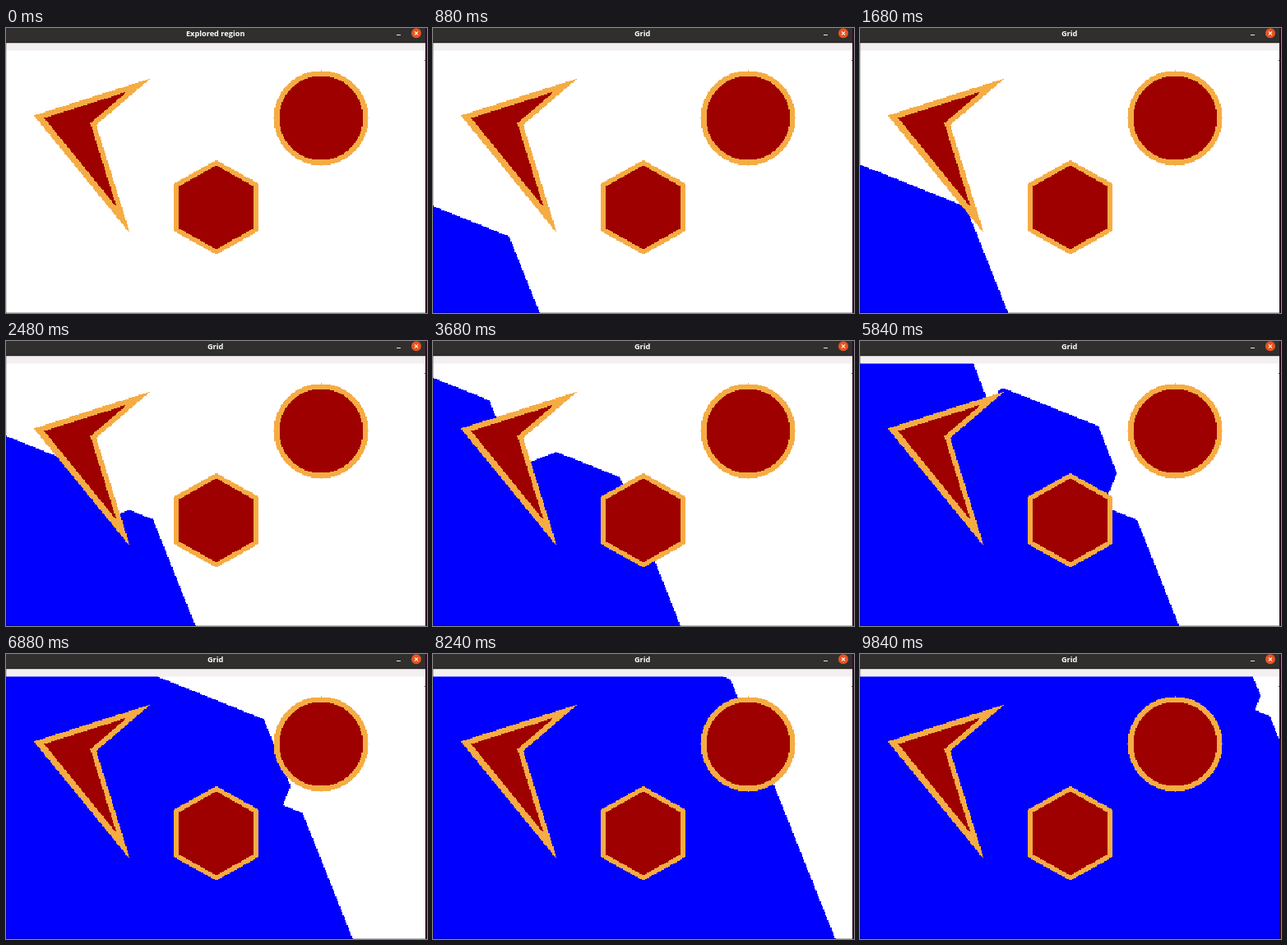
Recreate the animation shown at these times as an HTML page with a canvas. Size 512 by 347 pixels, loop 9.92 s.

```html
<!DOCTYPE html>
<html lang="en">
<head>
<meta charset="utf-8">
<title>Explored region</title>
<style>
  html, body { margin: 0; width: 100%; height: 100%; overflow: hidden; background: #fff; }
  canvas { position: absolute; left: 0; top: 27px; width: 510px; height: 320px; image-rendering: pixelated; }
  svg { position: absolute; left: 0; top: 0; display: block; }
</style>
</head>
<body>
<canvas id="map" width="400" height="250"></canvas>
<svg width="512" height="347" viewBox="0 0 512 347">
  <rect width="512" height="18" fill="#302f2e"/>
  <rect y="17" width="512" height="1.5" fill="#1f1e1d"/>
  <rect y="18.5" width="511" height="9" fill="#f4eff1"/>
  <text id="title" x="254.7" y="10" text-anchor="middle" fill="#fff" font-family="'Open Sans', 'Noto Sans', sans-serif" font-weight="700" font-size="9.2"></text>
  <rect x="475" y="8" width="5" height="1" fill="#e8e8e8"/>
  <circle cx="499" cy="6.3" r="6" fill="#e95420"/>
  <path d="M497 4.3l4 4m0-4l-4 4" stroke="#fff" stroke-width="1.1"/>
  <rect y="18" width="1" height="329" fill="#000" opacity=".2"/>
  <rect y="346" width="511" height="1" fill="#000" opacity=".25"/>
  <rect x="510" width="2" height="347" fill="#2d0a20"/>
  <rect x="509" y="39" width="2" height="1" fill="#333"/>
</svg>
<script>
const W = 400, H = 250, STEP = 80, FRAMES = 124;
const FREE = 0, MARGIN = 1, SOLID = 2;

const hexagon = (w, h) => [[0, h], [w, h / 2], [w, -h / 2], [0, -h], [-w, -h / 2], [-w, h / 2]]
  .map(([x, y]) => [200 + x, 100 + y]);
const solidShapes = [
  [[36, 185], [115, 210], [80, 180], [105, 100]],
  hexagon(35.4, 40)
];
const marginShapes = [
  [[26, 187.4], [137.3, 222.6], [85.6, 178.4], [117.6, 75.6]],
  hexagon(40.4, 44.9)
];

function inside(poly, x, y) {
  let hit = false;
  poly.forEach(([ax, ay], i) => {
    const [bx, by] = poly[(i + 1) % poly.length];
    if ((ay > y) !== (by > y) && x < ax + (y - ay) * (bx - ax) / (by - ay)) hit = !hit;
  });
  return hit;
}

function kindAt(x, y) {
  const r = Math.hypot(x - 300, y - 185);
  if (r < 40 || solidShapes.some(p => inside(p, x, y))) return SOLID;
  if (r <= 45 || marginShapes.some(p => inside(p, x, y))) return MARGIN;
  return FREE;
}

const kind = new Uint8Array(W * H);
for (let y = 0; y < H; y++)
  for (let x = 0; x < W; x++) kind[y * W + x] = kindAt(x, y);

// Dijkstra with bucketed costs: 5 per straight step, 7 per diagonal
const cost = new Int32Array(W * H).fill(1e9);
const order = [];
const buckets = [[0]];
cost[0] = 0;
for (let c = 0; c < buckets.length; c++) {
  for (const cell of buckets[c] || []) {
    if (cost[cell] !== c) continue;
    order.push(cell);
    const x = cell % W, y = (cell - x) / W;
    for (let dy = -1; dy <= 1; dy++) {
      for (let dx = -1; dx <= 1; dx++) {
        const nx = x + dx, ny = y + dy, next = ny * W + nx;
        if (nx < 0 || ny < 0 || nx >= W || ny >= H || kind[next] !== FREE) continue;
        const total = c + (dx && dy ? 7 : 5);
        if (total >= cost[next]) continue;
        cost[next] = total;
        (buckets[total] = buckets[total] || []).push(next);
      }
    }
  }
}

// step, x, y: cell the front has just reached
const reached = (x, y) => order.filter(cell => cost[cell] <= cost[y * W + x]).length;
const knots = [[0, 0], ...[
  [11, 101, 0], [31, 180, 0], [60, 272, 0], [86, 330, 0], [103, 383, 0], [123, 399, 190]
].map(([step, x, y]) => [step, reached(x, y)])];

function visited(step) {
  const i = Math.max(1, knots.findIndex(k => k[0] >= step));
  const [a, n] = knots[i - 1], [b, m] = knots[i];
  return Math.round(n + (m - n) * (step - a) / (b - a));
}

const ctx = document.getElementById('map').getContext('2d');
const title = document.getElementById('title');
const image = ctx.createImageData(W, H);
const colors = [[255, 255, 255], [245, 172, 67], [158, 0, 0]];

function paint(cell, [r, g, b]) {
  const x = cell % W, y = (cell - x) / W;
  image.data.set([r, g, b, 255], ((H - 1 - y) * W + x) * 4);
}

function draw(step) {
  const count = visited(step);
  kind.forEach((k, cell) => paint(cell, colors[k]));
  for (let i = 0; i < count; i++) paint(order[i], [0, 0, 255]);
  ctx.putImageData(image, 0, 0);
  title.textContent = step ? 'Grid' : 'Explored region';
}

let shown = -1;
const start = performance.now();
function tick() {
  const step = Math.floor(Math.max(0, performance.now() - start) / STEP) % FRAMES;
  if (step !== shown) draw(shown = step);
  requestAnimationFrame(tick);
}
tick();
</script>
</body>
</html>
```
